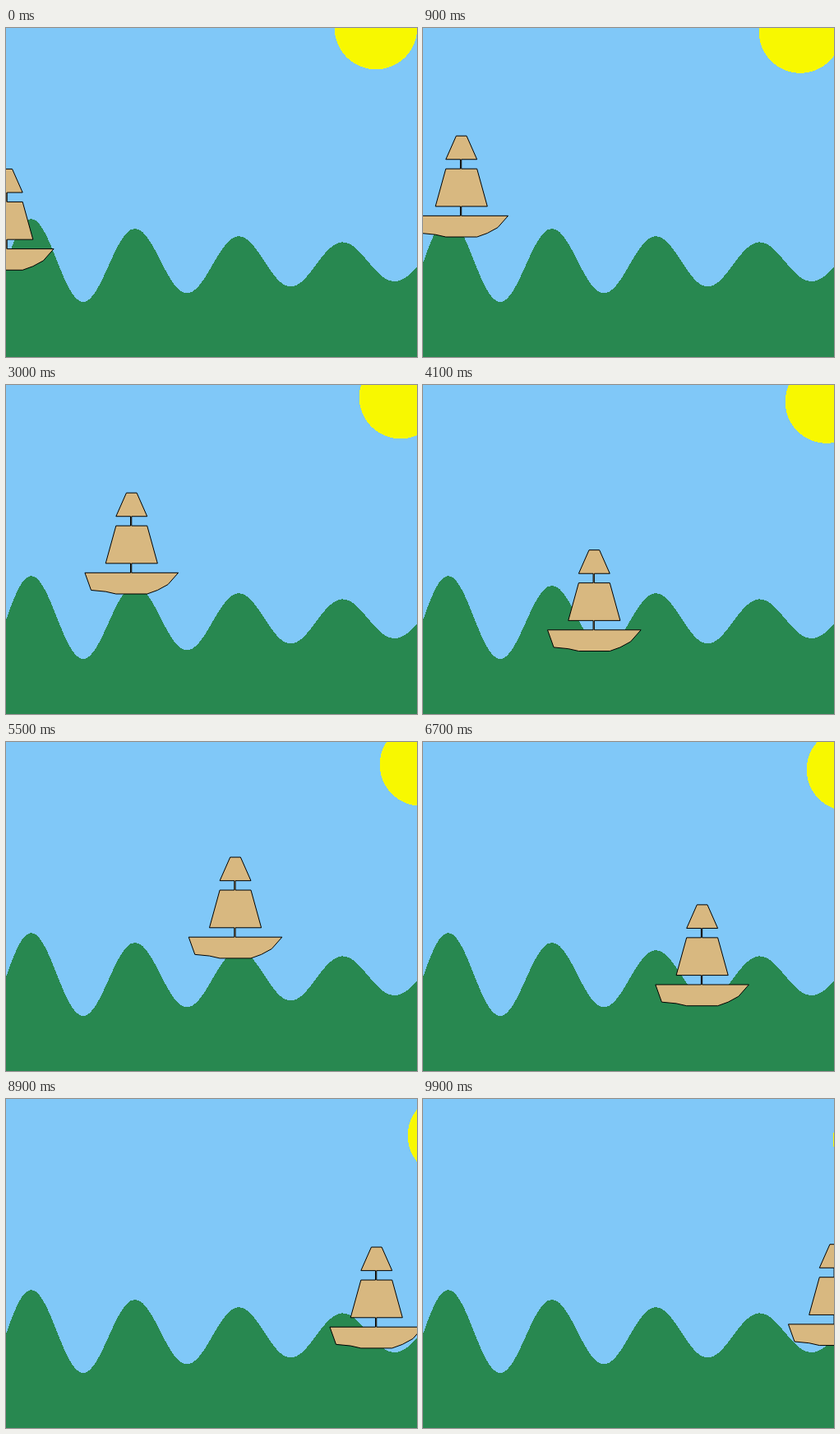
Write an HTML page that moves like this. It is 500x400 px and loops after 10 s.

```html
<!DOCTYPE html>
<html lang="en">
<head>
<meta charset="utf-8">
<title>Ship over the hills</title>
<style>
  html, body { margin: 0; width: 100%; height: 100%; overflow: hidden; }
  svg { display: block; background: #80c8f8; }
  .crisp { shape-rendering: crispEdges; }
</style>
</head>
<body>
<svg width="500" height="400">
  <circle id="sun" class="crisp" cx="450" r="50.3" fill="#f8f800"/>
  <polygon id="hills" class="crisp" fill="#288850"/>
  <polygon id="ship" fill="#d8b880" stroke="#000"/>
</svg>
<script>
const STEPS = 100, STEP_MS = 100;
const UX = 500 / 99, UY = 400 / 7;   // one step across, one wave unit down
const [sun, hills, ship] = ['sun', 'hills', 'ship'].map(id => document.getElementById(id));

const wave = i => 5 - Math.exp(-i / 100) * Math.sin(i * Math.PI * 8 / 100);

function setPoints(shape, points) {
  shape.setAttribute('points', points.map(([x, y]) => [x * UX, y * UY]).join(' '));
}

// One side of mast and sails, from the deck up; dir is 1 for right, -1 for left
function rig(dir, mast) {
  const sail = (halfWidth, y) => [.25 + dir * halfWidth, y];
  return [
    [mast, -.3], [mast, -.5], sail(6.25, -.5), sail(3.75, -1.3),
    [mast, -1.3], [mast, -1.5], sail(3.75, -1.5), sail(1.25, -2)
  ];
}

const hull = [[-11, -.3], [-9.5, .07], [-6, .1], [-3.5, .15], [4, .15], [6.5, .07], [9, -.05], [11.5, -.3]];
setPoints(ship, [...hull, ...rig(1, .25), ...rig(-1, 0).reverse()]);

const crest = Array.from({ length: STEPS }, (_, i) => [i, wave(i)]);
setPoints(hills, [[0, 7], ...crest, [99, 7]]);

function tick() {
  const i = Math.floor(performance.now() / STEP_MS) % STEPS;
  sun.setAttribute('transform', `translate(${i} ${i / 2})`);
  ship.setAttribute('transform', `translate(${i * UX} ${wave(i) * UY})`);
  requestAnimationFrame(tick);
}
tick();
</script>
</body>
</html>
```
